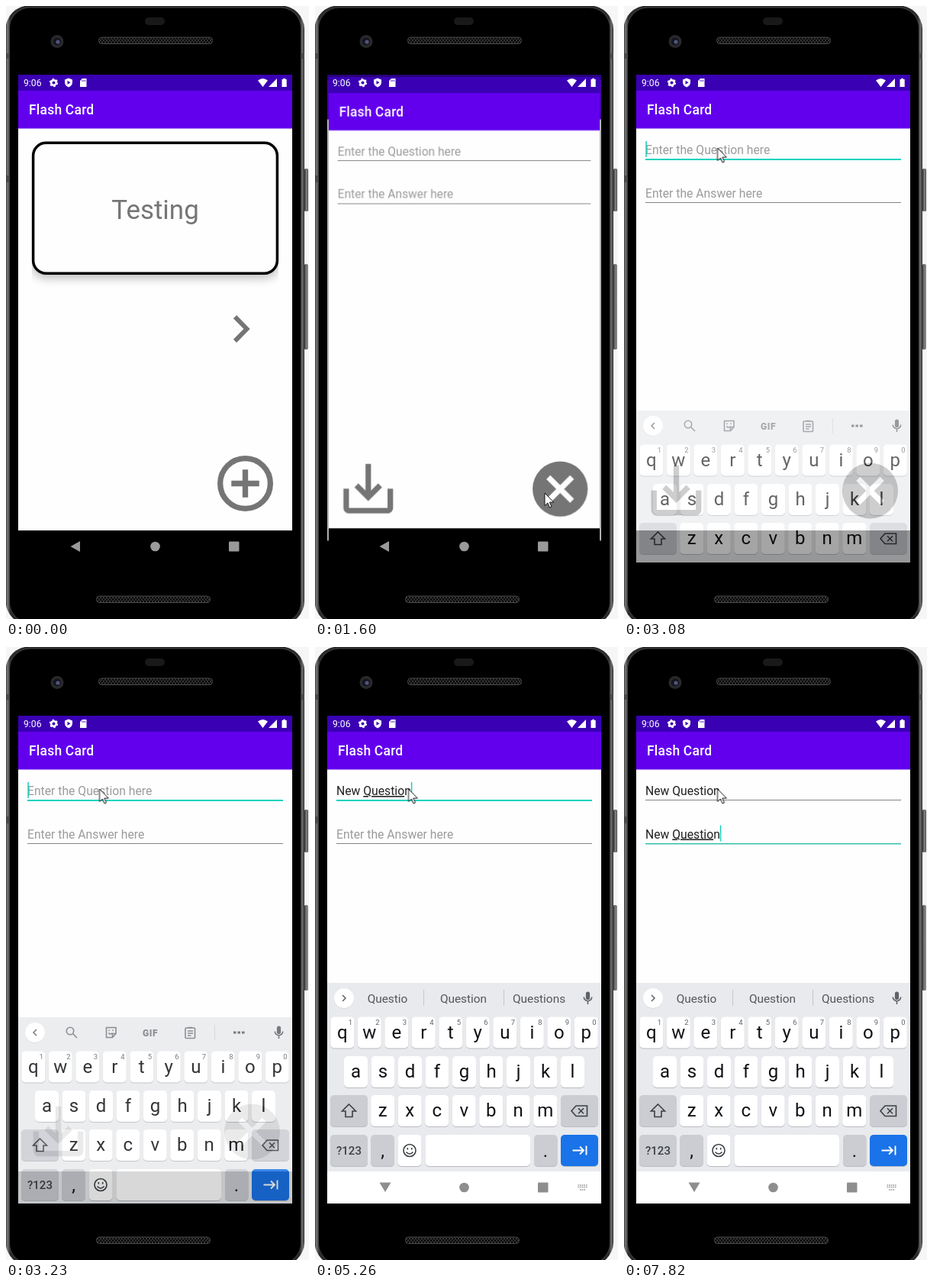
An HTML page that plays this animation: 397 px wide and 803 px high, repeating every 8000 ms.

```html
<!DOCTYPE html>
<html lang="en">
<head>
<meta charset="utf-8">
<title>Flash Card</title>
<style>
html, body { margin: 0; width: 100%; height: 100%; overflow: hidden; background: #f6f6f6; }
svg { display: block; width: 100%; height: 100%; }
text { font-family: Roboto, sans-serif; white-space: pre; }
.mid { text-anchor: middle; }
.title { font-size: 17.47px; font-weight: 500; letter-spacing: .0125em; fill: #fff; }
.field { font-size: 15.72px; fill: #212121; }
.hint { fill: #9b9b9b; }
.mark { text-decoration: underline 1px; }
.key { font-size: 24px; fill: #101114; }
.digit { font-size: 9.5px; fill: #5f6368; }
.word { font-size: 15.4px; fill: #53565b; }
.caps { text-transform: uppercase; }

#pointer, #home, #form, #board, #darkNav, #lightNav { animation: 8s step-end infinite; }
#home, #form { transform-origin: 195.5px 409.5px; }
#pointer { animation-name: pointer; }
#home { animation-name: home; }
#form { animation-name: form; }
#board { animation-name: board; }
#darkNav { animation-name: darkNav; }
#lightNav { animation-name: lightNav; }

@keyframes pointer {
  0% { opacity: 0; transform: translate(344px, 786px); }
  3.375% { opacity: 1; transform: translate(344px, 786px); animation-timing-function: steps(4); }
  7.375% { opacity: 1; transform: translate(286px, 624px); animation-timing-function: steps(4); }
  11.375%, 23.875% { opacity: 1; transform: translate(301px, 638px); }
  23.875% { animation-timing-function: steps(4); }
  27.75% { opacity: 1; transform: translate(300px, 680px); }
  28.75% { opacity: 1; transform: translate(296px, 692px); animation-timing-function: steps(3); }
  31.625% { opacity: 1; transform: translate(126px, 172px); animation-timing-function: steps(2); }
  33.5%, 100% { opacity: 1; transform: translate(122.5px, 186px); }
}
@keyframes home {
  0% { transform: none; opacity: 1; }
  18% { transform: scale(1.02); opacity: .9; }
  19% { transform: scale(1.04); opacity: .8; }
  20% { transform: scale(1.048); opacity: .7; }
  21.875%, 100% { transform: scale(1.048); opacity: 0; }
}
@keyframes form {
  0% { transform: scale(.9); opacity: 0; }
  18% { transform: scale(.91); opacity: .4; }
  19% { transform: scale(.97); opacity: 1; }
  20% { transform: scale(.99); opacity: 1; }
  21% { transform: scale(.996); opacity: 1; }
  21.875%, 100% { transform: none; opacity: 1; }
}
@keyframes board {
  0% { transform: translateY(290px); opacity: 0; }
  37.375% { transform: translateY(140px); opacity: .35; }
  38.5% { transform: translateY(90px); opacity: .65; }
  39.5% { transform: translateY(45px); opacity: .85; }
  40.4% { transform: translateY(18px); opacity: .95; }
  41.4% { transform: translateY(4px); opacity: 1; }
  42.4%, 100% { transform: none; opacity: 1; }
}
@keyframes darkNav { 0% { opacity: 1; } 37.375%, 100% { opacity: 0; } }
@keyframes lightNav { 0% { opacity: 0; } 40.4% { opacity: .5; } 41.4%, 100% { opacity: 1; } }
</style>
</head>
<body>
<svg viewBox="0 0 397 803">
  <defs>
    <linearGradient id="rim">
      <stop offset="0" stop-color="#2e2e2e"/><stop offset=".006" stop-color="#7a7a7a"/>
      <stop offset=".016" stop-color="#2a2a2a"/><stop offset=".984" stop-color="#2a2a2a"/>
      <stop offset=".994" stop-color="#6e6e6e"/><stop offset="1" stop-color="#2a2a2a"/>
    </linearGradient>
    <linearGradient id="side"><stop offset="0" stop-color="#333"/><stop offset=".6" stop-color="#8a8a8a"/><stop offset="1" stop-color="#444"/></linearGradient>
    <pattern id="mesh" width="4" height="5" patternUnits="userSpaceOnUse">
      <path d="M0 0L2 2.5L4 0M0 5L2 2.5L4 5" fill="none" stroke="#4c4c4c" stroke-width=".8"/>
    </pattern>
    <filter id="soft" x="-20%" y="-20%" width="140%" height="150%"><feGaussianBlur stdDeviation="7"/></filter>
    <clipPath id="glass"><rect x="16" y="90" width="359" height="639"/></clipPath>
    <clipPath id="cardArea"><rect x="34" y="178" width="323" height="196"/></clipPath>
    <g id="bars">
      <rect x="16" y="90" width="359" height="639"/>
      <rect x="16" y="90" width="359" height="597" fill="#fefefe"/>
      <rect x="16" y="90" width="359" height="21.5" fill="#3a00b4"/>
      <rect x="16" y="111" width="359" height="49.5" fill="#6200ee"/>
      <text class="title" x="30" y="142">Flash Card</text>
    </g>
    <g id="mic" fill="#5f6368">
      <rect x="-2.6" y="-8.5" width="5.2" height="10.5" rx="2.6"/>
      <path d="M-5.2-1.5a5.2 5.2 0 0 0 10.4 0M0 4v4" fill="none" stroke="#5f6368" stroke-width="1.6"/>
    </g>
  </defs>

  <!-- phone body -->
  <g>
    <rect x="391" y="213" width="5" height="56" rx="1.5" fill="url(#side)"/>
    <rect x="391" y="338" width="4.5" height="112" rx="1.5" fill="url(#side)"/>
    <rect x="-.5" y="-.5" width="391.5" height="811" rx="31" fill="url(#rim)"/>
    <path d="M0 62h5v7H0zM386 62h5v7H386zM0 222h4v9H0z" fill="#4a4a4a"/>
    <rect x="4.5" y="2" width="382" height="806" rx="27" stroke="#444"/>
    <rect x="182" y="15" width="26" height="10" rx="5" fill="#19191a"/>
    <circle cx="67" cy="46.5" r="8.5" fill="#29292c"/>
    <circle cx="67" cy="46.5" r="5" fill="#14141d"/>
    <circle cx="68" cy="47" r="2.6" fill="#50557e"/>
    <g fill="url(#mesh)" stroke="#4a4a4a">
      <rect x="121.5" y="41" width="149" height="8.5" rx="4"/>
      <rect x="118.5" y="773" width="149" height="8.5" rx="4"/>
    </g>
  </g>

  <g clip-path="url(#glass)">
    <g id="home">
      <use href="#bars"/>
      <g clip-path="url(#cardArea)">
        <rect x="34" y="186" width="323" height="170" rx="18" filter="url(#soft)" opacity=".28"/>
      </g>
      <rect x="35.6" y="179.3" width="319.8" height="171" rx="17" fill="#fefefe" stroke="#000" stroke-width="3.5"/>
      <text class="mid" x="195.5" y="278.5" font-size="34.94" fill="#757575">Testing</text>
      <path d="M300 407.2L315.5 423L300 438.8" fill="none" stroke="#757575" stroke-width="6"/>
      <g transform="translate(313.5 625.5) scale(3.65)" fill="none" stroke="#757575" stroke-width="2">
        <circle r="9"/><path d="M-5 0H5M0-5V5"/>
      </g>
    </g>

    <g id="form">
      <use href="#bars"/>
      <g id="fields"></g>
      <path transform="translate(24.7 590.7) scale(3.65)" fill="#757575" d="M19 12v7H5v-7H3v7c0 1.1.9 2 2 2h14c1.1 0 2-.9 2-2v-7h-2zm-6 .67l2.59-2.58L17 11.5l-5 5-5-5 1.41-1.41L11 12.67V3h2z"/>
      <g transform="translate(322.5 635) scale(3.65)">
        <circle r="10" fill="#757575"/>
        <path d="M-4.3-4.3L4.3 4.3M4.3-4.3L-4.3 4.3" stroke="#fefefe" stroke-width="2"/>
      </g>
    </g>

    <!-- status icons -->
    <g fill="#fff">
      <text x="23" y="105" font-size="12.2">9:06</text>
      <circle cx="62.5" cy="100.5" r="3.3" fill="none" stroke="#fff" stroke-width="2.6"/>
      <circle cx="62.5" cy="100.5" r="4.9" fill="none" stroke="#fff" stroke-width="1.5" stroke-dasharray="2.57"/>
      <path d="M82 94.5l5 2v3.5c0 3-2 5.2-5 6.5c-3-1.3-5-3.5-5-6.5v-3.5z"/>
      <path d="M80.5 97.8v5l4-2.5z" fill="#3a00b4"/>
      <path d="M100 95h5.5v11h-8.5v-8z"/>
      <path d="M99.8 97v2M101.7 97v2M103.6 97v2" stroke="#3a00b4" stroke-width=".8"/>
      <path d="M330 97.5q6.5-5 13 0L336.5 106zM355 95v11h-11z"/>
      <path d="M361.5 96h1.8v-1.3h2.6V96h1.8v10h-6.2z"/>
    </g>

    <g id="darkNav" fill="#9a9a9a">
      <path d="M84.5 708L97 701v14z"/><circle cx="195.5" cy="708" r="6.3"/>
      <rect x="292" y="701.5" width="13.5" height="13" rx="1"/>
    </g>

    <g id="board">
      <rect x="16" y="440" width="359" height="247" fill="#e8eaed"/>
      <rect x="16" y="687" width="359" height="42" fill="#fff"/>
      <circle cx="38" cy="460.5" r="13" fill="#c9cbcf"/><circle cx="38" cy="460" r="13" fill="#fff"/>
      <path id="chevron" fill="none" stroke="#5f6368" stroke-width="1.5"/>
      <use href="#mic" x="357.5" y="460"/>
      <g id="tools" fill="none" stroke="#777a7f" stroke-width="1.6">
        <circle cx="84" cy="458" r="4.7"/><path d="M87.5 461.5l5.5 5.5"/>
        <path d="M131.5 453.5h12.5v8l-4.5 5h-8zM144 461.5h-4.5v5M134.5 460.5q2 3 5 0M135 456.5v1.5M140 456.5v1.5"/>
        <rect x="235" y="454" width="12.5" height="13.5" rx="1"/>
        <path d="M238.5 453.5h5.5M238 458h7M238 461h7M238 464h4.5"/>
        <path d="M273.5 450v20" stroke="#cfd1d5" stroke-width="1"/>
        <path d="M298 460h3.5M303.5 460h3.5M309 460h3.5" stroke="#5f6368" stroke-width="3"/>
        <text class="mid" x="189" y="464.5" font-size="12" font-weight="900" letter-spacing=".6" fill="#777a7f" stroke="none">GIF</text>
      </g>
      <g id="words">
        <path d="M142.5 449v21M247.5 449v21" stroke="#c5c7cb"/>
        <text class="word mid" x="95" y="465.5"></text>
        <text class="word mid" x="194.5" y="465.5"></text>
        <text class="word mid" x="293.5" y="465.5"></text>
      </g>
      <g id="keys"></g>
      <g fill="none" stroke="#3c4043" stroke-width="1.6">
        <path d="M44.5 599l9 9h-4.5v7.5h-9V608h-4.5z"/>
        <path d="M342 601h14.5v13.5H342l-6-6.75zM345 604.3l7 7M352 604.3l-7 7"/>
        <circle cx="124" cy="659.5" r="8"/>
        <path d="M119.5 661.5q4.5 5 9 0M121.3 656v2.4M126.7 656v2.4"/>
        <path d="M337.5 659.5h14M347 654.5l5 5l-5 5M355.5 653.5v12" stroke="#fff" stroke-width="1.9"/>
      </g>
      <text class="mid" x="44.5" y="664.5" font-size="15" font-weight="500" fill="#3c4043">?123</text>
      <text class="mid key" x="88.5" y="667.5">,</text>
      <text class="mid key" x="302" y="667.5">.</text>
      <g id="lightNav" fill="#8e8e8e">
        <path d="M84.5 701.5h15L92 714z"/><circle cx="195.5" cy="708" r="6.3"/>
        <rect x="292" y="701.5" width="13.5" height="13" rx="1"/>
        <path d="M344.5 705h13M344.5 707.5h13M347 711h8" fill="none" stroke="#9a9a9a" stroke-width="1.5" stroke-dasharray="1.7 .9"/>
      </g>
    </g>
  </g>

  <path id="pointer" d="M0 0V16.5L3.9 13L6.5 19L9 17.9L6.4 12.1H11.8Z" fill="#fff" stroke="#111"/>
</svg>

<script>
const LOOP = 8000;
const $ = id => document.getElementById(id);

// Keyboard keys
const cap = (x, y, w, fill = '#fff') =>
  `<rect x="${x}" y="${y + 1}" width="${w}" height="41" rx="5" fill="#b9bcc1"/>` +
  `<rect x="${x}" y="${y}" width="${w}" height="41" rx="5" fill="${fill}"/>`;
const PITCH = 35.5, GREY = '#cbcdd2';
const rows = [['qwertyuiop', 35.8, 484.5], ['asdfghjkl', 53.5, 536], ['zxcvbnm', 88.7, 587]];
let caps = '', letters = '', digits = '';
for (const [chars, left, y] of rows) {
  [...chars].forEach((char, i) => {
    const x = left + i * PITCH;
    caps += cap(x - 15.5, y, 31);
    letters += `<text class="key mid" x="${x}" y="${y + 28}">${char}</text>`;
    if (y < 500) digits += `<text class="digit mid" x="${x + 10.5}" y="${y + 10.5}">${(i + 1) % 10}</text>`;
  });
}
caps += cap(20, 587, 49, GREY) + cap(322, 587, 49, GREY) + cap(20, 639, 49, GREY) + cap(73, 639, 31, GREY)
  + cap(108.5, 639, 31) + cap(144.5, 639, 137.5) + cap(287, 639, 30.5, GREY) + cap(322, 639, 49, '#1a73e8');
$('keys').innerHTML = `${caps}<g id="letters">${letters}</g>${digits}`;

// Input fields
const hints = ['Enter the Question here', 'Enter the Answer here'];
const fields = hints.map((hint, i) => {
  const g = document.createElementNS('http://www.w3.org/2000/svg', 'g');
  g.setAttribute('transform', `translate(28 ${177 + i * 56.5})`);
  g.innerHTML = '<text class="field" y="17"></text><rect/><rect width="1.5" height="21" fill="#19cdbc"/>';
  $('fields').append(g);
  const [text, line, caret] = g.children;
  line.setAttribute('width', 335);
  line.setAttribute('y', 23 + i * .5);
  return { hint, text, line, caret, tint: i ? '#35bfb0' : '#0fd3c0', weight: i ? 1.5 : 2 };
});

// Typing script: time, field, text, underlined range, suggestions, options
const states = [];
const add = (at, field, text = '', from = 0, to = 0, words = '', options = {}) =>
  states.push({ at, field, text, from, to, words, ...options });
const NEXT = 'one year and', NE = 'Ne Me Be', NEW = 'New News Newer';
const DONE = 'Question Questions Questioned';
function typeQuestion(field, times, lengths) {
  times.forEach((at, i) => {
    const n = lengths[i], typed = 'Question'.slice(0, n), known = typed.slice(0, -1);
    add(at, field, 'New ' + typed, 4, 3 + n, known ? `${known} Question Questions` : NEXT);
  });
}
add(0, -1);
add(2680, 0);
add(3780, 0, '', 0, 0, '', { shift: true });
add(3860, 0, 'N', 0, 1);
add(4010, 0, 'Ne', 0, 1, 'N No Not');
add(4090, 0, 'New', 0, 2, NE);
add(4320, 0, 'New', 0, 3, NEW);
add(4390, 0, 'New ', 0, 3, NEW);
add(4620, 0, 'New ', 0, 0, NEXT, { shift: true });
typeQuestion(0, [4700, 4850, 4930, 5010, 5090, 5180, 5260], [1, 2, 3, 4, 6, 7, 8]);
add(5490, 0, 'New Question', 4, 12, DONE);
add(5870, 1, '', 0, 0, DONE);
add(5960, 1);
add(6340, 1, '', 0, 0, '', { blink: true });
add(6490, 1, '', 0, 0, '', { blink: true, shift: true });
add(6580, 1, 'N', 0, 1);
add(6730, 1, 'New', 0, 2, NE);
add(6900, 1, 'New ', 0, 3, NEW);
add(7130, 1, 'New ', 0, 0, NEXT);
typeQuestion(1, [7280, 7360, 7430, 7510, 7590, 7670, 7740, 7820], [1, 2, 3, 4, 5, 6, 7, 8]);

function show(state) {
  const { field, text, from, to, words } = state;
  fields.forEach((f, i) => {
    const active = i === field;
    const value = active ? text : i < field ? 'New Question' : '';
    const marked = active
      ? `${value.slice(0, from)}<tspan class="mark">${value.slice(from, to)}</tspan>${value.slice(to)}` : value;
    f.text.innerHTML = value ? marked : f.hint;
    f.text.classList.toggle('hint', !value);
    f.line.setAttribute('height', active ? f.weight : 1);
    f.line.setAttribute('fill', active ? f.tint : '#858585');
    f.caret.setAttribute('x', value ? f.text.getComputedTextLength() : 0.3);
    f.caret.style.display = active && !state.blink ? '' : 'none';
  });
  $('tools').style.display = words ? 'none' : '';
  $('words').style.display = words ? '' : 'none';
  const list = words.split(' ');
  $('words').querySelectorAll('text').forEach((el, i) => { el.textContent = list[i] || ''; });
  $('chevron').setAttribute('d', words ? 'M36 456l4 4l-4 4' : 'M40 456l-4 4l4 4');
  $('letters').classList.toggle('caps', !!state.shift);
}

let start, current;
function tick(now) {
  start ??= now;
  const t = (now - start) % LOOP;
  const state = states.findLast(s => s.at <= t) || states[0];
  if (state !== current) show(current = state);
  requestAnimationFrame(tick);
}
show(current = states[0]);
requestAnimationFrame(tick);
</script>
</body>
</html>
```
